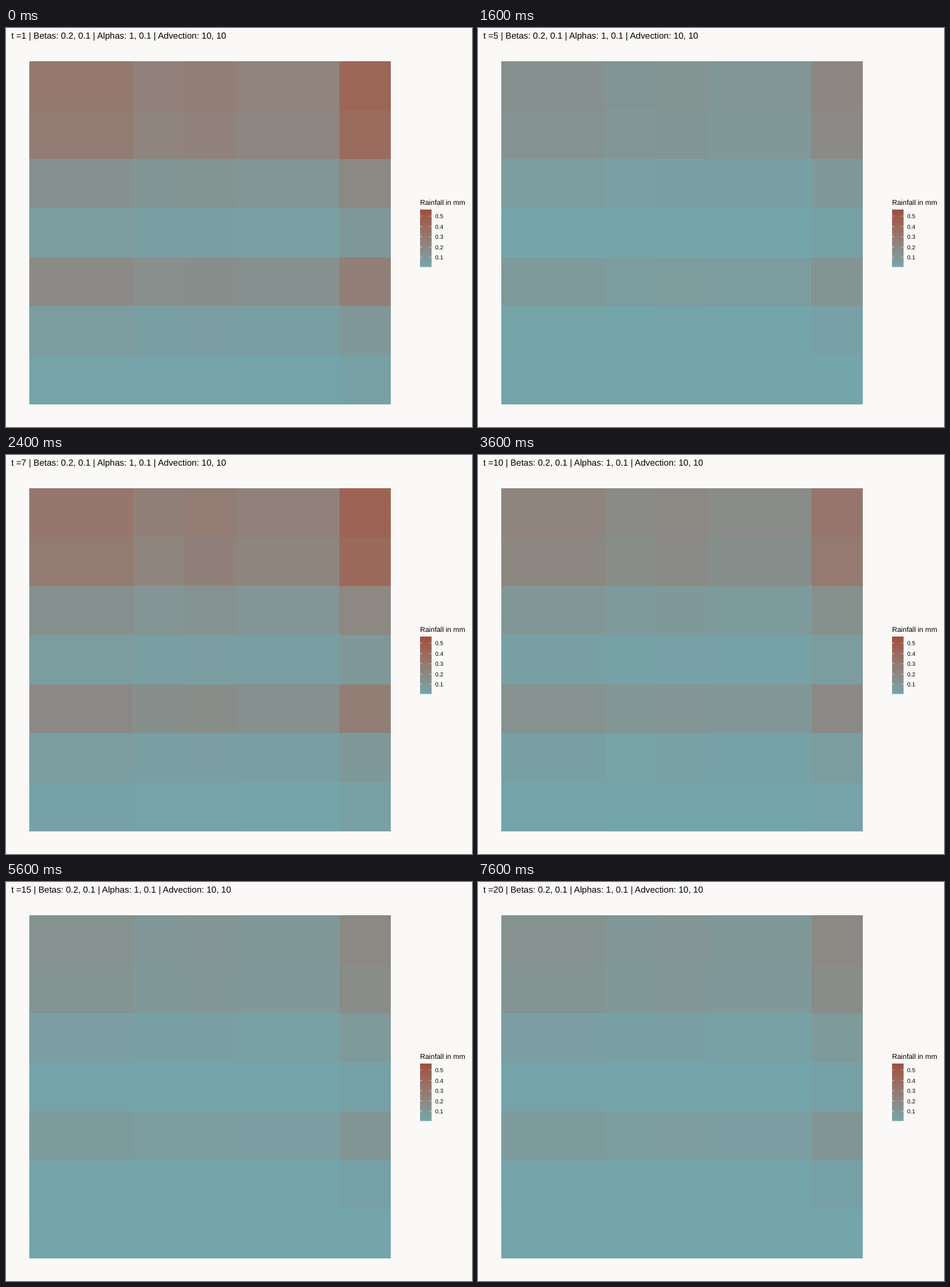
Write an HTML page that moves like this. It is 700x600 px and loops after 8 s.

```html
<!DOCTYPE html>
<html lang="en">
<head>
<meta charset="utf-8">
<title>Rainfall grid</title>
<style>
  html, body { margin: 0; width: 100%; height: 100%; overflow: hidden; background: #faf9f7; }
  svg { display: block; width: 700px; height: 600px; }
  text { font-family: "Liberation Sans", Arial, sans-serif; fill: #000; white-space: pre; text-rendering: geometricPrecision; }
</style>
</head>
<body>
<svg viewBox="0 0 700 600">
  <defs><linearGradient id="ramp" x1="0" y1="1" x2="0" y2="0"></linearGradient></defs>
  <text id="title" x="8" y="15.5" font-size="13.28"></text>
  <g id="grid" shape-rendering="crispEdges"></g>
  <text x="622" y="266" font-size="10.67">Rainfall in mm</text>
  <rect x="622" y="273" width="17.3" height="86.4" fill="url(#ramp)"></rect>
  <g id="legend" font-size="8.8"></g>
</svg>
<script>
const STEP = 400, STEPS = 20, SIZE = 7;
const MIN = 0.01, MAX = 0.565;
const LOW = [115, 165, 171], HIGH = [159, 79, 61], BEND = [11, 1, -2];

// Rainfall of a cell = its row's rain (mm) times its column's share
const rowRain = [.4, .367, .192, .088, .25, .091, .042];
const colShare = [1, 1, .82, .88, .775, .775, 1.38];

// Each shower: first step, intensity there, intensity at its last step
const showers = [[0, .78, .41], [5, 1, .6], [10, .44, .37], [12, .56, .35], [16, .61, .39]];

const $ = id => document.getElementById(id);
const edgeX = i => Math.round(35.4 + 77.55 * i);
const edgeY = i => Math.round(50 + 73.65 * i);

function add(parent, tag, attrs, text = "") {
  const el = document.createElementNS("http://www.w3.org/2000/svg", tag);
  for (const key in attrs) el.setAttribute(key, attrs[key]);
  el.textContent = text;
  return parent.appendChild(el);
}

// Blend from LOW to HIGH, bowed in the middle like a Lab gradient
function colour(mm) {
  const u = Math.min(1, Math.max(0, (mm - MIN) / (MAX - MIN)));
  const rgb = LOW.map((c, i) => Math.round(c + (HIGH[i] - c) * u + 4 * u * (1 - u) * BEND[i]));
  return `rgb(${rgb})`;
}

// Rain drops fast after the peak, then ever more slowly
function intensity(step) {
  const n = showers.findLastIndex(([start]) => start <= step);
  const [start, peak, low] = showers[n];
  const next = n + 1 < showers.length ? showers[n + 1][0] : STEPS;
  return peak + (low - peak) * Math.sqrt((step - start) / (next - start - 1));
}

const cells = [];
for (let r = 0; r < SIZE; r++) {
  for (let c = 0; c < SIZE; c++) {
    const x = edgeX(c), y = edgeY(r);
    const el = add($("grid"), "rect", { x, y, width: edgeX(c + 1) - x, height: edgeY(r + 1) - y });
    cells.push({ el, rain: rowRain[r] * colShare[c] });
  }
}

for (let u = 0; u <= 1; u += 1 / 16) {
  add($("ramp"), "stop", { offset: u, "stop-color": colour(MIN + (MAX - MIN) * u) });
}

for (let i = 1; i <= 5; i++) {
  const y = 360.4 - 15.5 * i;
  add($("legend"), "path", {
    d: `M622 ${y}h3.5M635.8 ${y}h3.5`, stroke: "#fff", "stroke-width": 0.5
  });
  add($("legend"), "text", { x: 644.7, y: y + 3.2 }, (i / 10).toFixed(1));
}

function draw(step) {
  const k = intensity(step);
  const loss = 0.03 * (1 - k);
  $("title").textContent = `t =${step + 1} | Betas: 0.2, 0.1 | Alphas: 1, 0.1 | Advection: 10, 10`;
  for (const { el, rain } of cells) el.setAttribute("fill", colour(rain * k - loss));
}

let shown = -1;
function tick() {
  const step = Math.floor(performance.now() / STEP) % STEPS;
  if (step !== shown) draw(shown = step);
  requestAnimationFrame(tick);
}
tick();
</script>
</body>
</html>
```
